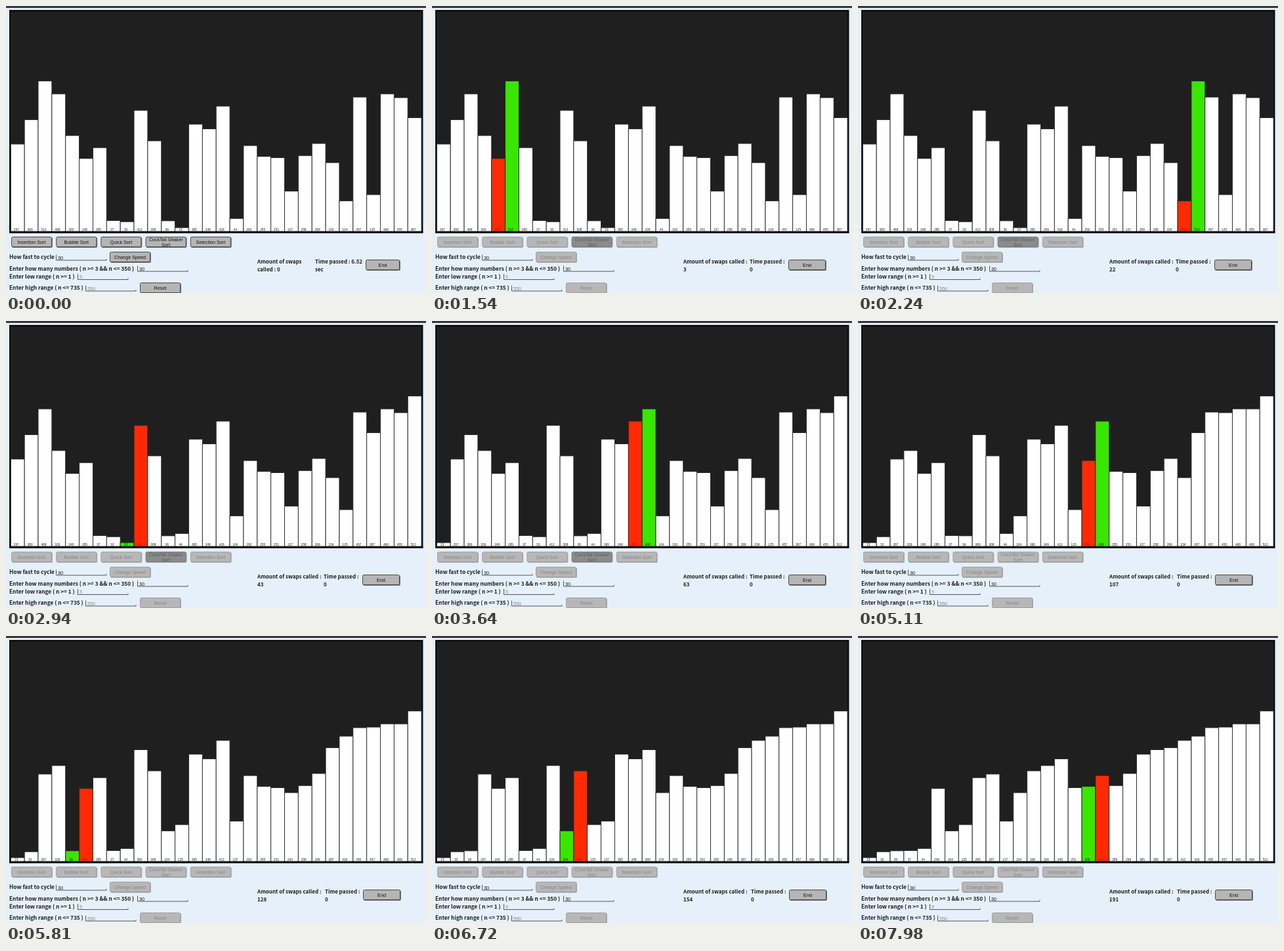
Recreate the animation shown at these times as an HTML page. Size 640 by 438 pixels, loop 8 s.

```html
<!DOCTYPE html>
<html lang="en">
<head>
<meta charset="utf-8">
<title>Sorting visualizer</title>
<style>
  html, body { margin: 0; width: 100%; height: 100%; overflow: hidden; background: #e6f0fa; }
  svg { display: block; width: 100vw; height: 100vh; }
  .label { font: 700 8.3px "Noto Sans CJK JP", "Noto Sans", sans-serif; fill: #1c1c1c; }
  .stat { font-size: 8px; }
  .ui { font: 7.2px "Liberation Sans", Arial, sans-serif; fill: #111; }
  .mid { text-anchor: middle; }
  .hint { fill: #858585; }
  .value { font: 4.8px "Liberation Sans", Arial, sans-serif; text-anchor: middle; fill: #222; }
  .field { fill: none; stroke: #555; stroke-width: 1; }
  .button rect { fill: #b5b5b5; stroke: #484848; stroke-width: 1; }
  .button .shade { fill: #777; stroke: none; }
  .button.hover .face { fill: #929292; }
  .button.off .face { fill: #b7b7b7; stroke: #a0a0a0; }
  .button.off .shade { fill: #aaa; }
  .button.off text { fill: #858585; }
  .button.off.hover .face { fill: #8b8b8b; stroke: #777; }
  .button.off.hover text { fill: #5c5c5c; }
</style>
</head>
<body>
<svg id="stage" viewBox="0 0 640 438"></svg>
<script>
const LOOP = 8000, TICK = 70, START = 1400;
const LEFT = 7.3, STEP = 20.86, FLOOR = 344, SCALE = 0.4485;
const WHITE = "#fff", GREEN = "#38e600", RED = "#ff2a04";
const numbers = [297, 380, 512, 468, 326, 248, 285, 37, 33, 412, 308, 36, 13, 365, 349,
  426, 44, 292, 255, 251, 137, 258, 299, 234, 104, 457, 125, 468, 455, 387];
// Swap count reached at given times; linear in between.
const pace = [[1400, 0], [1470, 1], [2240, 22], [3640, 63], [4480, 88],
  [5810, 128], [6720, 154], [7980, 191]];

const stage = document.getElementById("stage");

function add(tag, attrs, parent = stage, content = "") {
  const node = document.createElementNS("http://www.w3.org/2000/svg", tag);
  for (const name in attrs) node.setAttribute(name, attrs[name]);
  node.textContent = content;
  parent.append(node);
  return node;
}

const box = (x, y, width, height, fill) => add("rect", { x, y, width, height, fill });
const text = (x, y, content, cls, parent) => add("text", { x, y, class: cls }, parent, content);

function button(x, y, width, lines, height = 16) {
  const group = add("g", { class: "button" });
  add("rect", { x: x + 1, y: y + 1, width, height, rx: 2, class: "shade" }, group);
  add("rect", { x: x + 0.5, y: y + 0.5, width: width - 1, height: height - 1, rx: 2, class: "face" }, group);
  const first = y + height / 2 + (lines.length > 1 ? -0.9 : 2.8);
  lines.forEach((line, i) => text(x + width / 2, first + i * 7.7, line, "ui mid", group));
  return group;
}

function field(x, y, content, cls = "") {
  add("path", { d: `M${x + 0.5} ${y}v8.5h76.5v-2`, class: "field" });
  text(x + 3, y + 7, content, "ui " + cls);
}

// Every array state of a cocktail shaker sort, one per swap.
function shakerStates(source) {
  const list = source.slice();
  const states = [{ list: source, moved: -1, other: -1 }];
  const visit = (i, forward) => {
    if (list[i] <= list[i + 1]) return;
    [list[i], list[i + 1]] = [list[i + 1], list[i]];
    states.push({ list: list.slice(), moved: forward ? i + 1 : i, other: forward ? i : i + 1 });
  };
  for (let low = 0, high = list.length - 1; low < high; low++) {
    for (let i = low; i < high; i++) visit(i, true);
    high--;
    for (let i = high - 1; i >= low; i--) visit(i, false);
  }
  return states;
}

function swapsAt(time) {
  if (time <= START) return 0;
  const i = Math.max(1, pace.findIndex(([t]) => time <= t));
  const [t0, n0] = pace[i - 1], [t1, n1] = pace[i];
  return Math.round(n0 + (n1 - n0) * (time - t0) / (t1 - t0));
}

box(0, 0, 640, 438, "#e6f0fa");
box(0, 0, 640, 3, "#36383e");
box(5, 6, 630.5, 340.5, "#0c0c0c");
box(7, 8.5, 626, 335.5, "#1f1f1f");

const bars = numbers.map((_, i) => {
  const x = LEFT + i * STEP;
  return {
    rect: add("rect", { x, width: STEP, stroke: "#242424", "stroke-width": 0.9 }),
    value: text(x + STEP / 2 - 2, 342.8, "", "value")
  };
});
box(5, 344, 630.5, 2.5, "#0c0c0c");

const sorts = [["Insertion Sort"], ["Bubble Sort"], ["Quick Sort"], ["CockTail Shaker", "Sort"], ["Selection Sort"]]
  .map((lines, i) => button(8 + i * 68.2, 352, 62, lines));
const [, , , shaker, selection] = sorts;
const locked = [...sorts, button(158, 375, 62, ["Change Speed"]), button(204, 422, 62, ["Reset"])];

text(5, 386.4, "How fast to cycle", "label");
text(5, 404, "Enter how many numbers ( n >= 3 && n <= 350 )", "label");
text(5, 416, "Enter low range ( n >= 1 )", "label");
text(5, 433, "Enter high range ( n <= 735 )", "label");
field(76, 379.5, "30");
field(200, 396.5, "30");
field(109, 409, "5", "hint");
field(121, 426.5, "550", "hint");

const stats = [0, 1, 2, 3].map(i => text(383, i % 2 ? 405 : 393, "", "label stat"));
const idleEnd = button(548, 387, 52, ["End"]);
const busyEnd = button(543, 387, 57, ["End"]);

function showStats(running, count) {
  const shift = count > 99 ? 2 : 0;
  const lines = running
    ? ["Amount of swaps called :", count, "Time passed :", 0]
    : ["Amount of swaps", "called : 0", "Time passed : 6.52", "sec"];
  stats.forEach((node, i) => {
    node.textContent = lines[i];
    if (i > 1) node.setAttribute("x", running ? 484 + shift : 471);
  });
  idleEnd.style.display = running ? "none" : "";
  busyEnd.style.display = running ? "" : "none";
  busyEnd.setAttribute("transform", `translate(${shift / 2} 0)`);
}

const states = shakerStates(numbers);

function render(now) {
  const time = Math.floor((now % LOOP) / TICK) * TICK;
  const running = time >= START;
  const count = swapsAt(time);
  const { list, moved, other } = states[count];
  bars.forEach(({ rect, value }, i) => {
    const height = list[i] * SCALE;
    const fill = i === moved ? GREEN : i === other ? RED : WHITE;
    rect.setAttribute("y", FLOOR - height);
    rect.setAttribute("height", height);
    rect.setAttribute("fill", fill);
    value.textContent = list[i];
    value.style.fill = i === other ? "#a01800" : "";
  });
  locked.forEach(node => node.classList.toggle("off", running));
  selection.classList.toggle("hover", time >= 980 && time < 1120);
  shaker.classList.toggle("hover", time >= 1190 && time < 5040);
  showStats(running, count);
}

const begin = performance.now();
function loop() {
  render(performance.now() - begin);
  requestAnimationFrame(loop);
}
loop();
</script>
</body>
</html>
```
